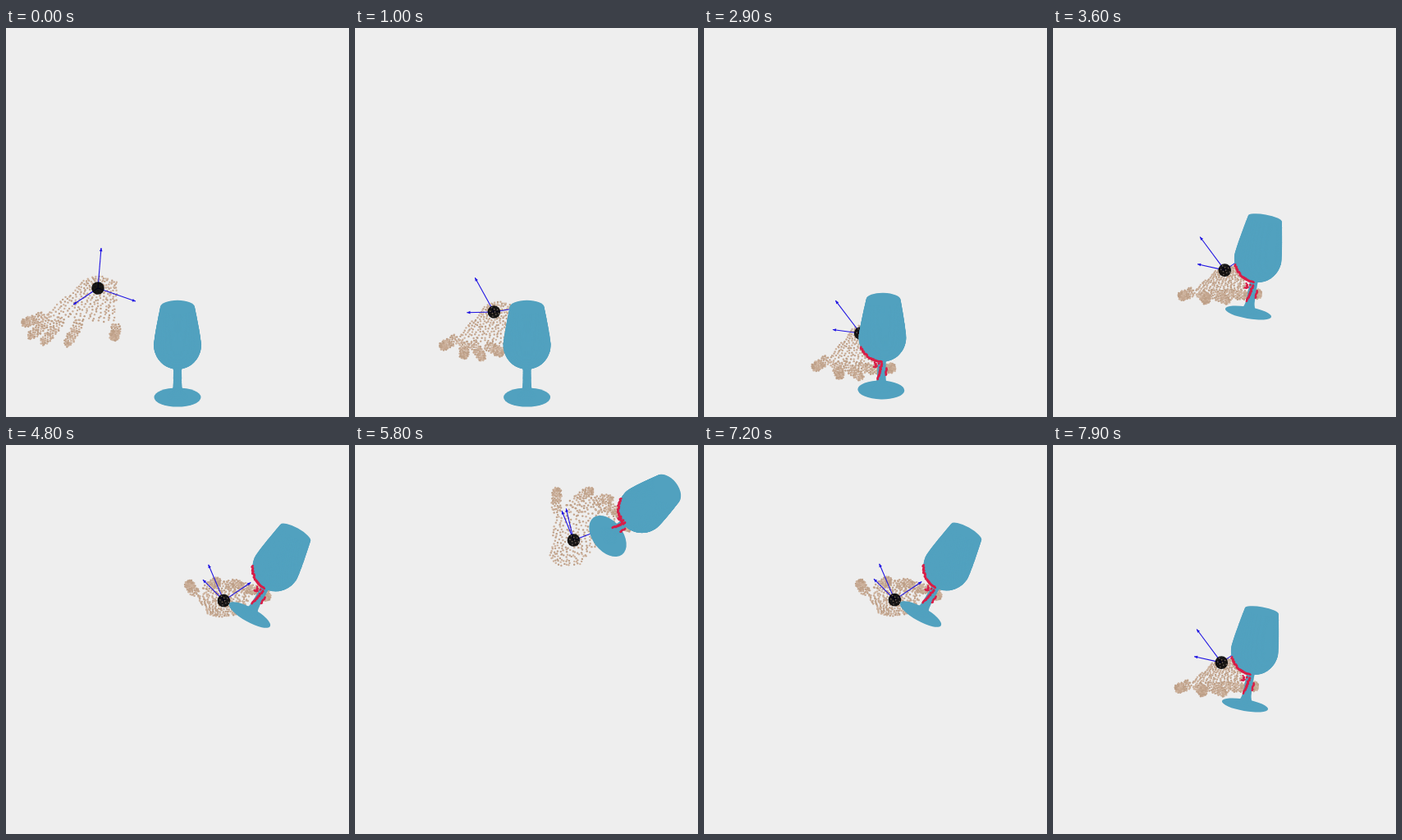
An HTML page with a canvas that plays this animation: 418 px wide and 474 px high, repeating every 8 s.

```html
<!DOCTYPE html>
<html lang="en">
<head>
<meta charset="utf-8">
<title>Hand lifting a glass</title>
<style>
  html, body { margin: 0; width: 100%; height: 100%; overflow: hidden; background: #eee; }
  canvas { display: block; }
</style>
</head>
<body>
<canvas id="stage" width="418" height="474"></canvas>
<script>
const ctx = document.getElementById('stage').getContext('2d');
const LOOP = 8000, STEP = 100, TOUCH = 2100;
const { sin, cos, abs, sqrt, PI } = Math;

// Glass path: time, foot x, foot y, how far it is turned to pour
const PATH = [
  [0, 209, 450, 0],
  [TOUCH, 210.5, 450, 0],
  [2700, 213, 450, 0.01],
  [3600, 238, 347, 0.19],
  [4800, 297, 207, 0.55],
  [5800, 308, 111, 0.98],
  [6050, 309, 107, 1],
  [6300, 306, 108, 0.98],
  [7200, 264, 206, 0.55],
  [7900, 234, 317, 0.19]
];

// Holding hand in the glass frame: sideways, up, depth
const WRIST = [-39, 25.6, 80];
const HOLD = {
  palm: [[-50, 13, 122], [-15, 28, 105], [-6, 31, -35], [-70, 2.4, 40]],
  tips: [[-87, 0, 1], [-50, 10, -32], [-24, 18, -36], [-4, 25, -15], [11, 27, 0]],
  axes: [[-38, 33, 6], [-34, 5, -18], [19, 28, -28]],
  bend: [0, 4, -18]
};
// Open hand on screen, seen from the wrist
const OPEN_WRIST = [112, 317];
const OPEN = {
  palm: [[-16, -12], [24, -7], [23, 43], [-64, 33]],
  tips: [[-93, 44], [-85, 61], [-69, 69], [-39, 71], [19, 64]],
  axes: [[4, -49], [-30, 20], [46, 16]]
};

const clamp = (x, a = 0, b = 1) => Math.min(b, Math.max(a, x));
const mix = (a, b, p) => a + (b - a) * p;
const mix2 = (a, b, p) => [mix(a[0], b[0], p), mix(a[1], b[1], p)];
const add = (a, b) => a.map((x, i) => x + b[i]);
const smooth = p => p * p * (3 - 2 * p);
const slope = (n, i) => (PATH[n + 1][i] - PATH[n][i]) / (PATH[n + 1][0] - PATH[n][0]);

// Monotone tangent of column i at key n
function tangent(n, i) {
  const last = PATH.length - 1;
  if (n === 0 || n === last) return slope(Math.min(n, last - 1), i);
  const a = slope(n - 1, i), b = slope(n, i);
  return a * b <= 0 ? 0 : 2 * a * b / (a + b);
}

function along(t, i) {
  let n = 0;
  while (n < PATH.length - 2 && t >= PATH[n + 1][0]) n++;
  const [a, b] = [PATH[n], PATH[n + 1]], h = b[0] - a[0];
  const p = clamp((t - a[0]) / h), q = 1 - p;
  return q * q * (1 + 2 * p) * a[i] + p * q * q * h * tangent(n, i) +
    p * p * (3 - 2 * p) * b[i] - p * p * q * h * tangent(n + 1, i);
}

function glassAt(t) {
  const turn = clamp(along(t, 3));
  return {
    x: along(t, 1), y: along(t, 2), turn,
    tilt: 53 * turn * PI / 180,
    pitch: (24 - 64 * smooth(turn ** 0.85)) * PI / 180,
    spin: 0.22 * turn ** 3
  };
}

// Point of the holding hand on screen; the hand keeps a least angle of its own.
function project([x, y, z], g) {
  const side = x * cos(g.spin) + z * sin(g.spin);
  const depth = z * cos(g.spin) - x * sin(g.spin);
  const up = y * cos(g.pitch) + depth * sin(g.pitch) + 8 * (1 - clamp(g.turn / 0.19));
  const a = Math.max(g.tilt, 0.21);
  return [g.x + side * cos(a) + up * sin(a), g.y + side * sin(a) - up * cos(a)];
}

function handAt(t, g) {
  const s = clamp(t / TOUCH), close = 1 - (1 - s) ** 2.4;
  const held = project(WRIST, g);
  const wrist = [mix(OPEN_WRIST[0], held[0], close), mix(OPEN_WRIST[1], held[1], smooth(s))];
  const fromWrist = p => project(p, g).map((x, i) => x - held[i]);
  const place = part => HOLD[part].map((p, i) =>
    add(wrist, mix2(OPEN[part][i], fromWrist(p), close)));
  return {
    wrist, palm: place('palm'), tips: place('tips'),
    axes: HOLD.axes.map((v, i) => add(wrist, mix2(OPEN.axes[i], fromWrist(add(WRIST, v)), close))),
    bend: fromWrist(add(WRIST, HOLD.bend)).map(x => x * close)
  };
}

let seed = 17;
const rnd = () => (seed = seed * 16807 % 2147483647) / 2147483647;
const TONES = ['#cdb29d', '#c5a790', '#bd9f87'];
const spread = n => Array.from({ length: n }, (_, i) => ({
  u: (0.5 + i * 0.75488 + rnd() * 0.03) % 1,
  v: (0.5 + i * 0.56984 + rnd() * 0.03) % 1,
  tone: TONES[Math.floor(rnd() * 3)]
}));
const palmDots = spread(240);
const digits = [0, 0.1, 0.25, 0.5, 1].map(root => ({ root, dots: spread(75) }));

function dot([x, y], size, color) {
  ctx.fillStyle = color;
  ctx.beginPath();
  ctx.arc(x, y, size, 0, 7);
  ctx.fill();
}

function drawHand({ palm, tips, bend }) {
  const [w1, w2, thumb, knuckle] = palm;
  for (const d of palmDots) {
    const v = d.v - 0.1 * sin(PI * d.u) * (1 - d.v);
    dot(mix2(mix2(w1, w2, d.u), mix2(knuckle, thumb, d.u), v), 1.2, d.tone);
  }
  digits.forEach(({ root, dots }, i) => {
    const base = mix2(knuckle, thumb, root), tip = tips[i];
    const curled = i > 0 && i < 4;
    const mid = curled ? add(mix2(base, tip, 0.4), bend) : mix2(base, tip, 0.5);
    for (const d of dots) {
      const p = d.u ** 0.65, a = mix2(base, mid, p), b = mix2(mid, tip, p);
      const dx = b[0] - a[0], dy = b[1] - a[1], len = Math.hypot(dx, dy) || 1;
      const cap = Math.max(0, p * 4 - 3);
      const w = (d.v * 2 - 1) * 6 * sqrt(1 - cap * cap);
      dot(add(mix2(a, b, p), [-dy / len * w, dx / len * w]), 1.25, d.tone);
    }
  });
}

function arrow([x, y], [ex, ey]) {
  const a = Math.atan2(ey - y, ex - x);
  ctx.strokeStyle = ctx.fillStyle = '#2015e2';
  ctx.lineWidth = 1.1;
  ctx.beginPath();
  ctx.moveTo(x, y);
  ctx.lineTo(ex, ey);
  ctx.stroke();
  ctx.beginPath();
  ctx.moveTo(ex, ey);
  for (const side of [-0.42, 0.42]) ctx.lineTo(ex - 4.5 * cos(a + side), ey - 4.5 * sin(a + side));
  ctx.fill();
}

function drawWrist({ wrist, axes }, t) {
  axes.forEach(end => arrow(wrist, end));
  dot(wrist, 7.8, 'rgba(0,0,0,0.9)');
  if (t < 1000) return;
  for (let i = 0; i < 9; i++) {
    const r = 2.2 * sqrt(i + 0.3), a = i * 2.4;
    dot(add(wrist, [r * cos(a), r * sin(a)]), 0.8, '#77685f');
  }
}

// The glass is turned on a lathe: a radius for each height.
const BOWL = { r: 29, mid: 70, low: 30, top: 120 };
function radius(y) {
  const { r, mid, low, top } = BOWL;
  if (y === 0) return 28.5;
  if (y > mid) return r - 8 * ((y - mid) / (top - mid)) ** 1.2;
  const stem = 5 + 9 * Math.exp(-y / 5), k = (mid - y) / low;
  return k < 1 ? Math.max(stem, r * sqrt(1 - k * k)) : stem;
}

function drawGlass(g) {
  const flat = abs(sin(g.pitch));
  ctx.fillStyle = '#51a1bf';
  for (let y = 0; y <= BOWL.top; y++) {
    const r = radius(y);
    ctx.beginPath();
    ctx.ellipse(0, -y * cos(g.pitch), r, Math.max(0.9, r * flat), 0, 0, 7);
    ctx.fill();
  }
}

const scatter = n => Array.from({ length: n }, (_, i) => ({ p: i / n, a: rnd(), b: rnd() }));
const stemMarks = scatter(26), bowlMarks = scatter(50), webMarks = scatter(22);

function drawContact(g, t) {
  const shown = clamp((t - 1800) / 600), c = cos(g.pitch);
  const mid = BOWL.mid * c, low = Math.hypot(BOWL.low * c, BOWL.r * sin(g.pitch));
  const mark = (x, up) => dot([x, -up], 1.25, '#d81e48');
  const some = (marks, draw) => marks.slice(0, Math.round(shown * marks.length)).forEach(draw);
  some(stemMarks, m => mark(-5 * (1 - m.p) + m.a * 1.5, (14 + 22 * m.p) * c));
  some(bowlMarks, m => {
    const angle = 1.15 * m.p, grow = 1 + (m.a - 0.5) * 0.06;
    mark(-BOWL.r * sin(angle) * grow, mid - low * cos(angle) * grow);
  });
  some(webMarks, m => m.p < 0.4
    ? mark(5 + m.a * 1.5, (20 + 25 * m.p) * c)
    : mark(-10 * m.a, (24 + 12 * m.b) * c));
}

function draw(t) {
  const g = glassAt(t), hand = handAt(t, g);
  ctx.fillStyle = '#eee';
  ctx.fillRect(0, 0, 418, 474);
  drawHand(hand);
  drawWrist(hand, t);
  ctx.save();
  ctx.translate(g.x, g.y);
  ctx.rotate(g.tilt);
  drawGlass(g);
  drawContact(g, t);
  ctx.restore();
}

const start = performance.now();
function tick() {
  const t = (performance.now() - start) % LOOP;
  draw(Math.floor(t / STEP) * STEP);
  requestAnimationFrame(tick);
}
tick();
</script>
</body>
</html>
```
